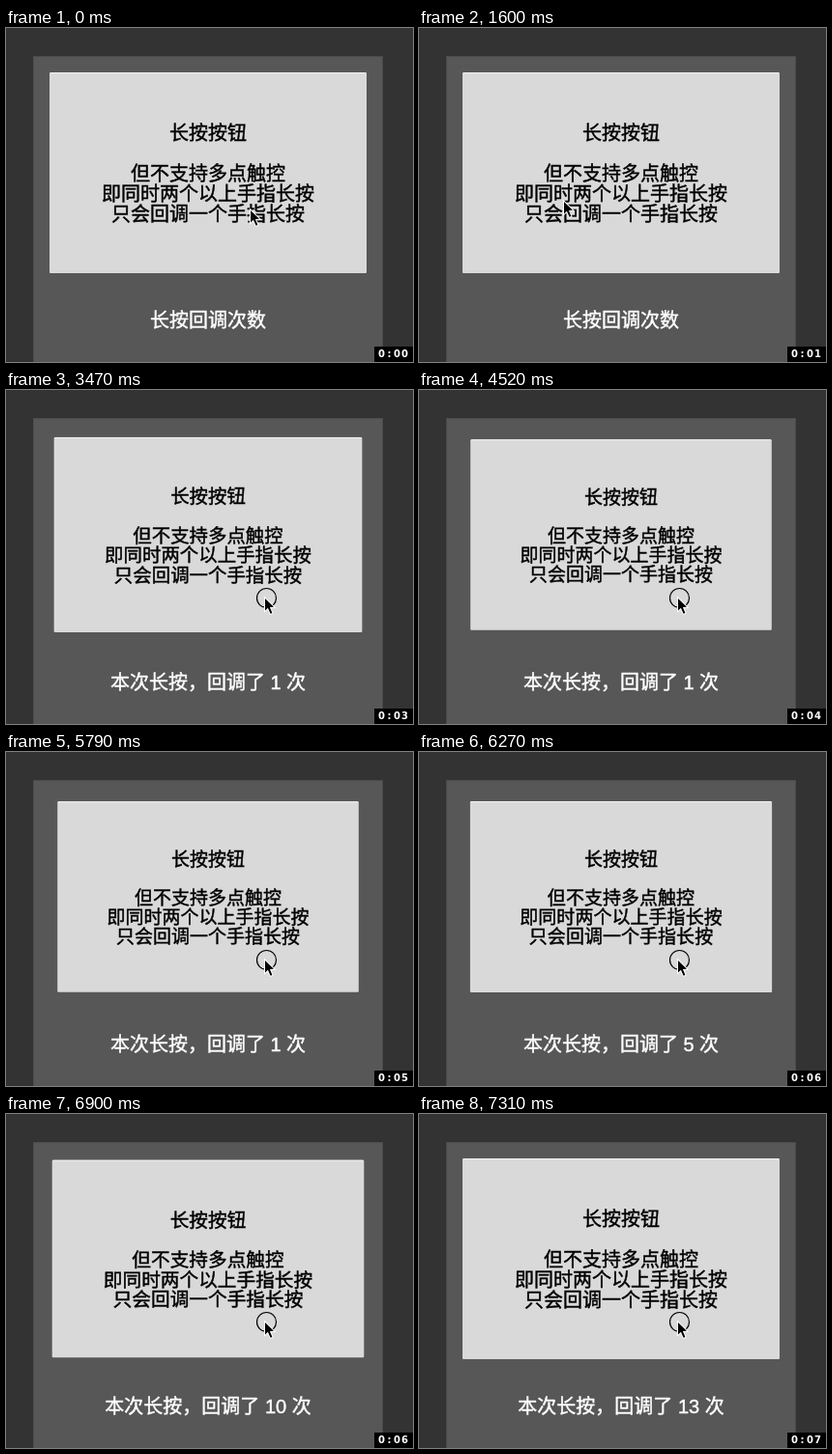
Animation, 421 px wide and 346 px high, one loop 8000 ms. Source, as an HTML page with a canvas:

```html
<!DOCTYPE html>
<html lang="zh-CN">
<head>
<meta charset="utf-8">
<style>
html, body { margin: 0; width: 100%; height: 100%; overflow: hidden; background: #333; }
canvas { display: block; width: 421px; height: 346px; }
</style>
</head>
<body>
<canvas id="stage" width="421" height="346"></canvas>
<script>
const ctx = document.getElementById('stage').getContext('2d');
const LOOP = 8000;
const FONT = '20px "Liberation Sans", "Noto Sans CJK SC", "Noto Sans CJK", sans-serif';
const LINES = ['长按按钮', '', '但不支持多点触控', '即同时两个以上手指长按', '只会回调一个手指长按'];

// Each long press fires one callback; the last is held and keeps firing
const PRESSES = [3458, 4496, 5112, 5766];
const HELD_CALLS = 13;
const PULSE = 117.6, DOWN = 24, UP = 86;

const START = { x: 252, y: 187 };
const MOVES = [
  { from: 60, to: 340, x: 219, y: 161 },
  { from: 490, to: 1270, x: 148, y: 161, lift: 15 },
  { from: 1420, to: 1600, x: 149, y: 178 },
  { from: 1690, to: 2220, x: 206, y: 209 },
  { from: 2220, to: 2310, x: 267, y: 214 }
];

const clamp = v => Math.min(1, Math.max(0, v));
const wave = p => Math.sin(clamp(p) * Math.PI / 2) ** 2;

function pointerAt(t) {
  let { x, y } = START;
  for (const m of MOVES) {
    const p = clamp((t - m.from) / (m.to - m.from));
    x += (m.x - x) * p;
    y += (m.y - y) * p - (m.lift || 0) * Math.sin(Math.PI * p);
  }
  return [Math.round(x), Math.round(y)];
}

function pressAt(t) {
  const i = PRESSES.filter(start => start <= t).length - 1;
  if (i < 0) return { count: 0, scale: 1 };
  const calls = i === PRESSES.length - 1 ? HELD_CALLS : 1;
  const age = t - PRESSES[i];
  const n = Math.min(calls - 1, Math.floor(age / PULSE));
  const a = age - n * PULSE;
  const depth = a < DOWN ? wave(a / DOWN) : 1 - wave((a - DOWN) / UP);
  return { count: n + 1, scale: 1 - 0.05 * depth };
}

function rect(x, y, w, h, color) {
  ctx.fillStyle = color;
  ctx.fillRect(x, y, w, h);
}

function text(str, x, y, color, font = FONT, weight = 0.45) {
  ctx.font = font;
  ctx.textAlign = 'center';
  ctx.fillStyle = ctx.strokeStyle = color;
  ctx.lineWidth = weight;
  ctx.lineJoin = 'round';
  ctx.fillText(str, x, y);
  if (weight) ctx.strokeText(str, x, y);
}

function drawPanel() {
  rect(0, 0, 421, 346, '#333');
  rect(28, 29, 362, 317, '#4c4c4c');
  rect(29, 30, 360, 316, '#575757');
}

function drawButton(scale) {
  ctx.save();
  ctx.translate(209, 150);
  ctx.scale(scale, scale);
  ctx.beginPath();
  ctx.roundRect(-164, -104, 328, 208, 1);
  ctx.fillStyle = '#d9d9d9';
  ctx.fill();
  rect(-163, -104, 326, 1, '#f4f4f4');
  LINES.forEach((line, i) => text(line, 0, 21 * i - 34, '#000'));
  ctx.restore();
}

function drawPointer(x, y) {
  const shape = [[1, 2], [1, 14.5], [3.9, 11.8], [6.6, 17.8], [8.4, 17], [5.9, 11], [10, 10.8]];
  ctx.beginPath();
  shape.forEach(([dx, dy]) => ctx.lineTo(x + dx, y + dy));
  ctx.closePath();
  ctx.lineJoin = 'miter';
  ctx.lineWidth = 2;
  ctx.strokeStyle = '#fff';
  ctx.stroke();
  ctx.fillStyle = '#000';
  ctx.fill();
}

function drawRing() {
  ctx.beginPath();
  ctx.arc(269.5, 215.5, 10, 0, Math.PI * 2);
  ctx.lineWidth = 1.2;
  ctx.strokeStyle = '#000';
  ctx.stroke();
}

function drawClock(t) {
  const sec = Math.max(0, Math.floor((t - 18) / 988.5));
  rect(381, 330, 40, 16, '#000');
  [...`0:0${Math.min(sec, 7)}`].forEach((c, i) =>
    text(c, 388.5 + 8 * i, 341, '#fff', 'bold 10px "DejaVu Sans", sans-serif', 0));
}

function draw(t) {
  const { count, scale } = pressAt(t);
  drawPanel();
  drawButton(scale);
  text(count ? `本次长按，回调了 ${count} 次` : '长按回调次数', 209, 310, '#fff');
  if (t >= 2810) drawRing();
  drawPointer(...pointerAt(t));
  drawClock(t);
}

const begin = performance.now();
function tick() {
  draw((performance.now() - begin) % LOOP);
  requestAnimationFrame(tick);
}
tick();
</script>
</body>
</html>
```
